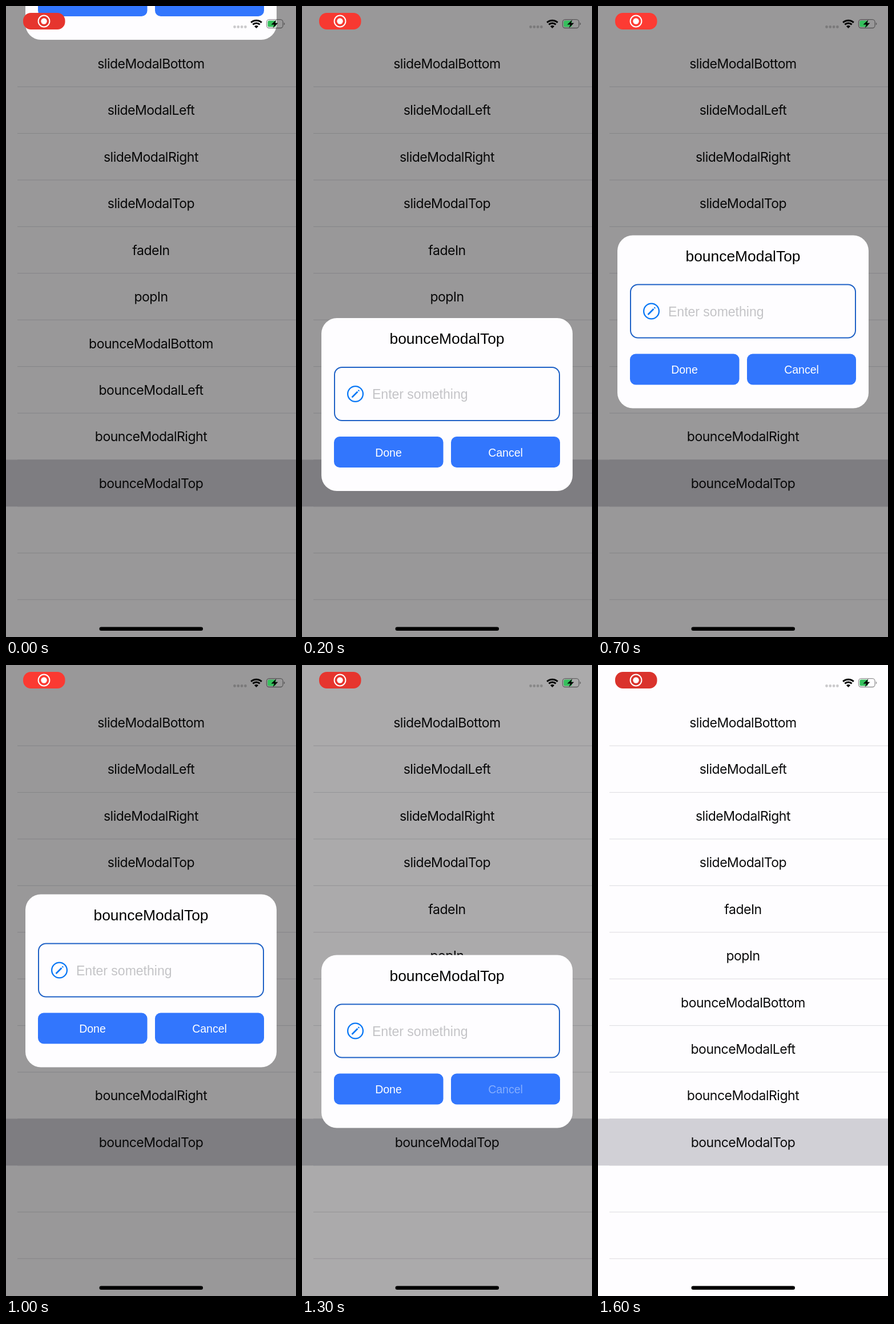
These frames come from a looping animation (508 by 1102 pixels, 1.7 s). An HTML page:

```html
<!DOCTYPE html>
<html lang="en">
<head>
<meta charset="utf-8">
<title>Modal bounce</title>
<style>
  html, body { margin: 0; width: 100%; height: 100%; overflow: hidden; background: #fefdff; }
  svg { display: block; width: 100%; height: 100%; }
  text { text-anchor: middle; }
  #list text { font: 23px Inter, sans-serif; letter-spacing: -.5px; fill: #0b0b0c; }
  #card text { font-family: "Liberation Sans", Arial, sans-serif; }
  .button { fill: #3276fd; }
  .label { font-size: 19.5px; fill: #fff; }
</style>
</head>
<body>
<svg viewBox="0 0 508 1102">
  <rect width="508" height="1102" fill="#fefdff"/>
  <g id="list"></g>
  <rect id="dim" width="508" height="1102"/>

  <g id="card">
    <rect x="34" width="440" height="302" rx="27" fill="#fefdff"/>
    <text x="254" y="45" font-size="26.4">bounceModalTop</text>
    <rect x="57" y="86" width="394" height="93" rx="13" fill="none" stroke="#2062c6" stroke-width="2"/>
    <g fill="none" stroke="#0a78f5" stroke-width="2.3">
      <circle cx="93.5" cy="132.5" r="13.4"/>
      <path d="M87.5 138.5L97.5 128.5M98.6 127.4L100 126" stroke-width="2.7"/>
    </g>
    <text x="123" y="141" font-size="23" fill="#c4c4c7" style="text-anchor:start">Enter something</text>
    <rect class="button" x="56" y="207" width="191.5" height="54" rx="10"/>
    <rect class="button" x="261" y="207" width="191" height="54" rx="10"/>
    <text class="label" x="151.5" y="241.5">Done</text>
    <text class="label" id="cancel" x="356.5" y="241.5">Cancel</text>
  </g>

  <!-- status bar -->
  <rect id="pill" x="30" y="12" width="73.5" height="29" rx="13.5"/>
  <circle cx="66.5" cy="26.5" r="9.9" fill="none" stroke="#fff" stroke-width="2"/>
  <circle cx="66.5" cy="26.5" r="5.2" fill="#fff"/>
  <path d="M400.5 36.5h20" stroke="#000" stroke-opacity=".2" stroke-width="4.8" stroke-linecap="round" stroke-dasharray="0 6.3"/>
  <g fill="none" stroke="#000" stroke-width="3">
    <path d="M429.2 28.8A13.7 13.7 0 0 1 447.8 28.8"/>
    <path d="M432.4 32.4A8.9 8.9 0 0 1 444.6 32.4"/>
    <path d="M438.5 39L435 35.4A5 5 0 0 1 442 35.4Z" fill="#000" stroke="none"/>
  </g>
  <rect x="456.5" y="23.7" width="28.6" height="14.8" rx="4.5" fill="none" stroke="#000" stroke-opacity=".42" stroke-width="1.3"/>
  <path d="M486.8 28.7a2.6 2.6 0 0 1 0 4.8z" fill-opacity=".45"/>
  <rect x="458.4" y="25.6" width="14.5" height="11" rx="2.6" fill="#35c05c"/>
  <path d="M473.5 24L464.5 32.4H470L467.5 38.4L476.5 29.7H471.2Z"/>

  <rect x="163.5" y="1084.5" width="181.5" height="6.6" rx="3.3"/>
</svg>
<script>
  const $ = id => document.getElementById(id);
  const LOOP = 1700, STEP = 100, ROW = 81.43;
  const names = ["slideModalBottom", "slideModalLeft", "slideModalRight", "slideModalTop",
    "fadeIn", "popIn", "bounceModalBottom", "bounceModalLeft", "bounceModalRight", "bounceModalTop"];

  // list rows: separators, selected row, labels
  let rows = "";
  for (let i = 0; i < 12; i++)
    rows += `<rect x="20" y="${140.5 + i * ROW}" width="488" height="1.1" fill="#dfdee2"/>`;
  rows += `<rect y="792.4" width="508" height="81.8" fill="#d1d0d6"/>`;
  names.forEach((name, i) => rows += `<text x="254" y="${109 + i * ROW}">${name}</text>`);
  $("list").innerHTML = rows;

  // [time, value] keys
  const cardY = [[0, -243], [100, 270], [200, 545], [300, 500], [400, 423], [500, 403], [600, 400.5],
    [1200, 400.5], [1300, 506.5], [1400, 155], [1500, -320]];
  const dim = [[1200, .4], [1300, .33], [1400, .125], [1500, .01], [1600, 0]];
  const cancel = [[1100, 1], [1200, .25], [1300, .4], [1400, .75], [1500, 1]];
  const red = [[0, 230], [200, 247], [400, 254], [1000, 251], [1300, 230], [1400, 222], [1600, 218]];

  function at(keys, t) {
    const i = keys.findIndex(k => k[0] > t);
    if (i < 0) return keys[keys.length - 1][1];
    if (i === 0) return keys[0][1];
    const [t0, a] = keys[i - 1], [t1, b] = keys[i];
    return a + (b - a) * (t - t0) / (t1 - t0);
  }

  const start = performance.now();
  function draw() {
    const t = Math.floor((performance.now() - start) % LOOP / STEP) * STEP;
    const r = at(red, t);
    $("card").setAttribute("transform", `translate(0 ${at(cardY, t)})`);
    $("dim").setAttribute("opacity", at(dim, t));
    $("cancel").setAttribute("opacity", at(cancel, t));
    $("pill").setAttribute("fill", `rgb(${r} ${r * .232} ${r * .2})`);
    requestAnimationFrame(draw);
  }
  draw();
</script>
</body>
</html>
```
